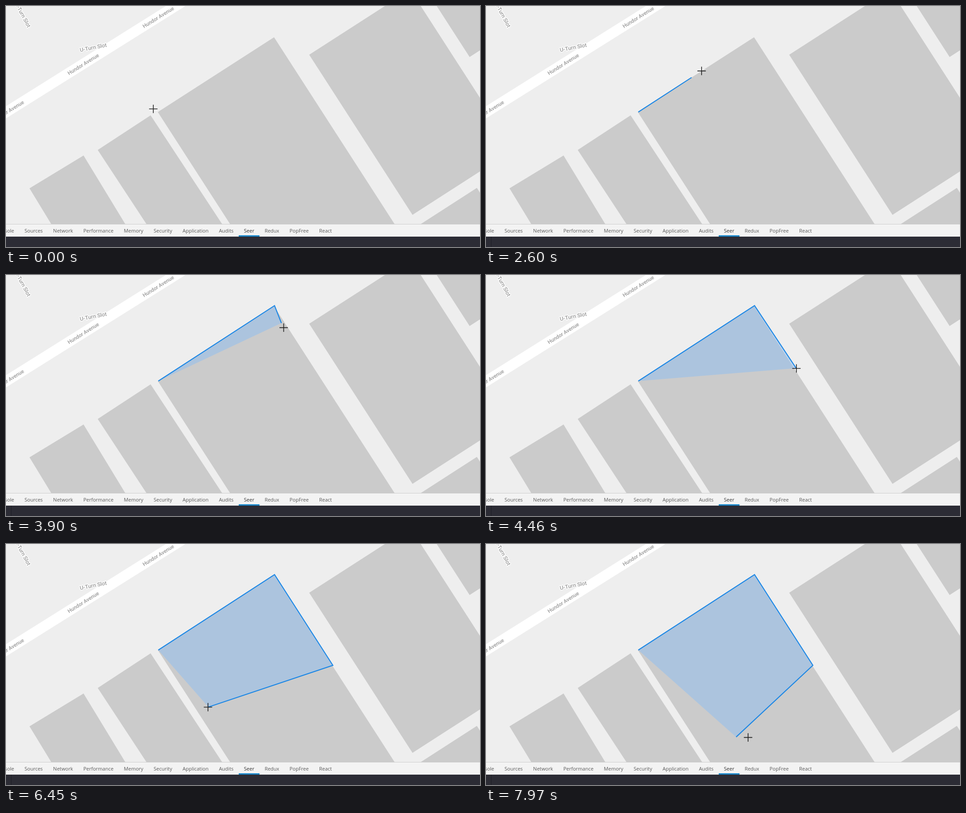
Animation of 1049x534 px, one loop 8 s. Source, as an HTML page with a canvas:

```html
<!DOCTYPE html>
<html lang="en">
<head>
<meta charset="utf-8">
<title>Drawing a polygon on a map</title>
<style>
  html, body { margin: 0; width: 100%; height: 100%; overflow: hidden; }
  canvas { display: block; }
</style>
</head>
<body>
<canvas id="stage" width="1049" height="534"></canvas>
<script>
const ctx = document.getElementById('stage').getContext('2d');
const LOOP = 8000;
const LAG = 50; // the drawn line trails the pointer
const TABS = 'Console Sources Network Performance Memory Security Application Audits Seer Redux PopFree React'.split(' ');

const linear = u => u;
const speedUp = u => u ** 2.4;
const inOut = power => u =>
  u < 0.5 ? (2 * u) ** power / 2 : 1 - (2 - 2 * u) ** power / 2;
const smooth = inOut(2);

// Corners of the drawn shape
const first = { x: 337, y: 235 };
const apex = { x: 594.3, y: 67.8 };
const third = { x: 723.4, y: 268.9 };

const clicks = [
  { at: 1590, end: 1730, corner: first },
  { at: 3520, end: 3670, corner: apex },
  { at: 5610, end: 5740, corner: third }
];

// Each move starts where the one before it ended; bow bends it sideways
const home = { x: 326, y: 228 };
const moves = [
  { at: 0, end: 400, to: { x: 237, y: 129 }, ease: smooth },
  { at: 400, end: 1330, to: first, ease: smooth },
  { at: 1730, end: 3420, to: apex, ease: inOut(3) },
  { at: 3670, end: 4415, to: { x: 687, y: 207 }, ease: linear, bow: 12 },
  { at: 4480, end: 5260, to: third, ease: smooth },
  { at: 5740, end: 6430, to: { x: 447, y: 361.5 }, ease: smooth },
  { at: 6450, end: 7090, to: { x: 436, y: 388 }, ease: smooth },
  { at: 7320, end: 7970, to: { x: 580, y: 428.6 }, ease: speedUp, bow: 11 }
];

function pointerAt(t) {
  let from = home;
  for (const { at, end, to, ease, bow = 0 } of moves) {
    if (t < at) break;
    if (t < end) {
      const p = ease((t - at) / (end - at));
      const dx = to.x - from.x, dy = to.y - from.y;
      const side = 4 * p * (1 - p) * bow / Math.hypot(dx, dy);
      return { x: from.x + dx * p - dy * side, y: from.y + dy * p + dx * side };
    }
    from = to;
  }
  return from;
}

function rect(x, y, w, h, color) {
  ctx.fillStyle = color;
  ctx.fillRect(x, y, w, h);
}

function rotated(x, y, degrees, draw) {
  ctx.save();
  ctx.translate(x, y);
  ctx.rotate(degrees * Math.PI / 180);
  draw();
  ctx.restore();
}

const block = (x, y, width, depth, degrees = -32.8) =>
  rotated(x, y, degrees, () => rect(0, 0, width, depth, '#cbcbcb'));

const mapLabel = (text, x, y, degrees, size) => rotated(x, y, degrees, () => {
  ctx.font = `500 ${size}px Roboto, sans-serif`;
  ctx.textAlign = 'center';
  ctx.lineJoin = 'round';
  ctx.lineWidth = 3;
  ctx.strokeStyle = '#fff';
  ctx.strokeText(text, 0, 4);
  ctx.fillStyle = '#999';
  ctx.fillText(text, 0, 4);
});

function drawMap() {
  rect(0, 0, 1049, 534, '#eee');
  rotated(0, 235.5, -32.1, () => rect(-50, -11.5, 600, 23, '#fff'));
  block(52, 404, 140, 200, -31.3);
  block(203, 319, 140, 300, -33.3);
  block(336, 235, 306, 600);
  block(671, 108, 266, 422);
  block(1026, 113, 100, -200);
  block(874, 511.4, 200, 100);
  for (let i = 0; i < 3; i++) {
    mapLabel('Hundor Avenue', 337 - 166 * i, 25 + 104 * i, -32, 11.5);
  }
  mapLabel('U-Turn Slot', 193, 92, -11, 12);
  mapLabel('U-Turn Slot', 37, 20, 62, 12);
}

function drawPanel(t) {
  rect(0, 483, 1049, 28, '#f3f3f3');
  rect(0, 483, 1049, 1, '#ccc');
  rect(0, 511, 1049, 23, '#2c2c35');
  if (t >= 1750) rect(11, 511, 1, 23, '#1c1c24');
  ctx.font = '11px "Open Sans", sans-serif';
  ctx.textAlign = 'left';
  const gap = 23;
  let x = 18 - ctx.measureText(TABS[0]).width;
  for (const name of TABS) {
    const width = ctx.measureText(name).width;
    const active = name === 'Seer';
    if (active) rect(Math.round(x - gap / 2), 508, Math.round(width + gap), 3, '#1a87c9');
    ctx.fillStyle = active ? '#333' : '#5a5a5a';
    ctx.fillText(name, x, 502);
    x += width + gap;
  }
}

function drawPolygon(t) {
  const corners = clicks.filter(c => t >= c.at).map(c => c.corner);
  if (!corners.length) return;
  corners.push(pointerAt(t - LAG));
  ctx.beginPath();
  corners.forEach(({ x, y }) => ctx.lineTo(x, y));
  ctx.fillStyle = 'rgba(146, 191, 240, 0.53)';
  ctx.fill();
  ctx.lineJoin = 'miter';
  ctx.lineWidth = 2.2;
  ctx.strokeStyle = '#1e88e5';
  ctx.stroke();
}

function drawPointer(t) {
  const { x, y } = pointerAt(t);
  if (clicks.some(c => t >= c.at && t < c.end)) {
    ctx.beginPath();
    ctx.arc(x, y, 9.7, 0, Math.PI * 2);
    ctx.fillStyle = 'rgba(255, 240, 20, 0.62)';
    ctx.fill();
  }
  ctx.fillStyle = 'rgba(0, 0, 0, 0.85)';
  ctx.beginPath();
  ctx.rect(x - 9.3, y - 0.8, 18.6, 1.6);
  ctx.rect(x - 0.8, y - 9.3, 1.6, 18.6);
  ctx.fill();
}

const start = performance.now();
function frame() {
  const t = (performance.now() - start) % LOOP;
  drawMap();
  drawPolygon(t);
  drawPointer(t);
  drawPanel(t);
  requestAnimationFrame(frame);
}
frame();
</script>
</body>
</html>
```
